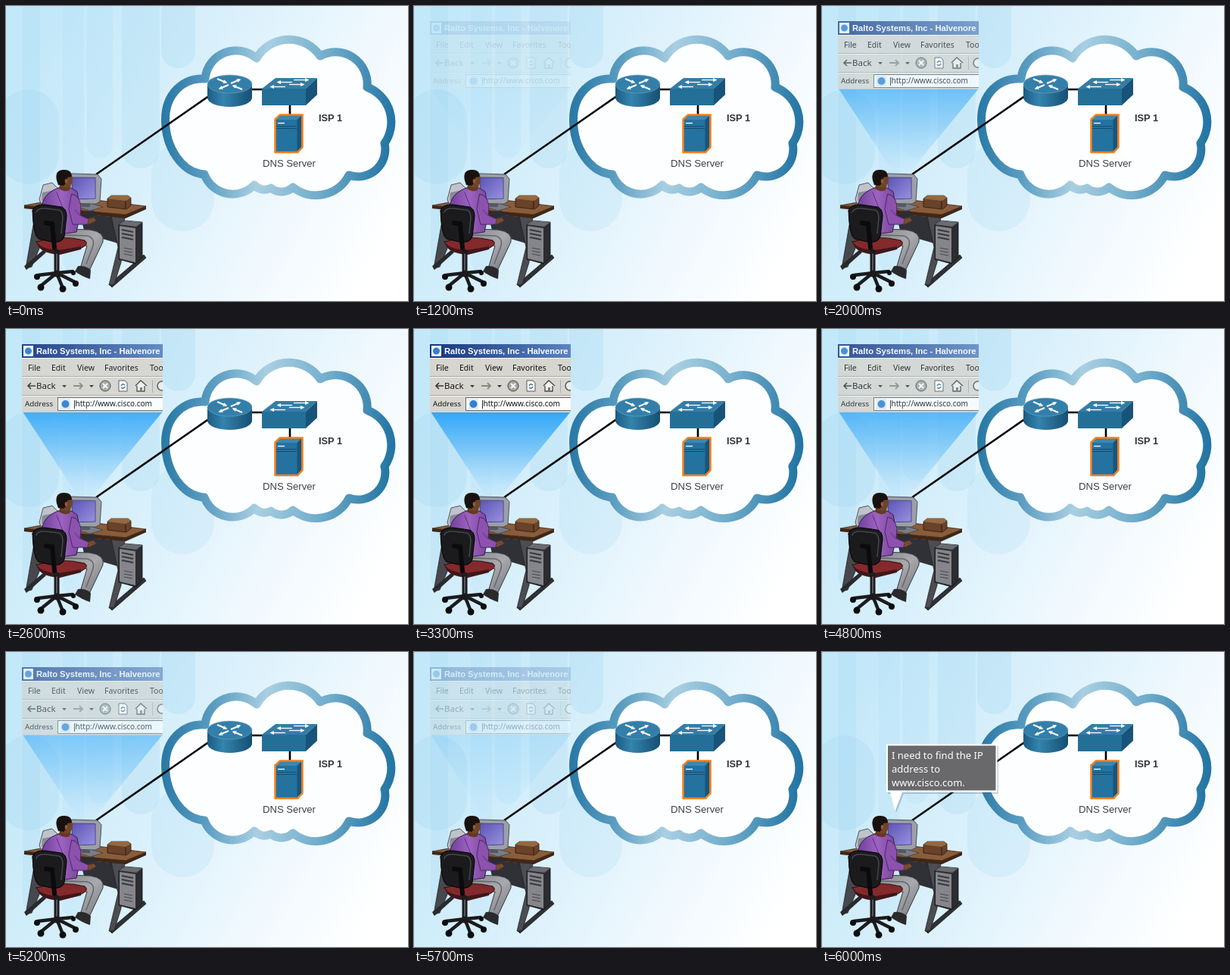
These frames come from a looping animation (531 px wide and 389 px high, 8000 ms). An HTML page:

```html
<!DOCTYPE html>
<html lang="en">
<head>
<meta charset="utf-8">
<title>DNS lookup</title>
<style>
  html, body { margin: 0; width: 100%; height: 100%; overflow: hidden; }
  svg { display: block; width: 531px; height: 389px; }
  text { white-space: pre; }
  .label { font: 13.1px "Liberation Sans", Arial, sans-serif; fill: #3f4042; }
  .bold { font: 700 12.800px "Liberation Sans", Arial, sans-serif; fill: #333436; }
  .ui { font-family: "Noto Sans", "Open Sans", sans-serif; fill: #111; }
  .say { font: 13px "Noto Sans", "Open Sans", sans-serif; fill: #fff; }
  .wire { stroke: #000; stroke-width: 2.6; fill: none; }
  .arrow { stroke: #fff; fill: none; marker-end: url(#tip); }
</style>
</head>
<body>
<svg viewBox="0 0 531 389" xmlns="http://www.w3.org/2000/svg">
  <defs>
    <linearGradient id="sky" x1="0" y1=".3" x2="1" y2=".68">
      <stop offset="0" stop-color="#c3e8f9"/>
      <stop offset=".4" stop-color="#d9f0fb"/>
      <stop offset=".75" stop-color="#f1f9fe"/>
      <stop offset="1" stop-color="#fff"/>
    </linearGradient>
    <linearGradient id="rim" x1="0" x2="1" y1=".45" y2=".5">
      <stop offset="0" stop-color="#2b7aa7"/>
      <stop offset=".2" stop-color="#5b9dc1"/>
      <stop offset=".43" stop-color="#a9cfe2"/>
      <stop offset=".7" stop-color="#72adcc"/>
      <stop offset="1" stop-color="#2576a4"/>
    </linearGradient>
    <linearGradient id="drum">
      <stop offset="0" stop-color="#1c5b82"/>
      <stop offset=".35" stop-color="#3384ae"/>
      <stop offset="1" stop-color="#174f73"/>
    </linearGradient>
    <linearGradient id="beamFill" x2="0" y2="1">
      <stop offset="0" stop-color="#2fa6f8"/>
      <stop offset=".45" stop-color="#83caf8"/>
      <stop offset="1" stop-color="#d3edfc" stop-opacity=".3"/>
    </linearGradient>
    <linearGradient id="bar">
      <stop offset="0" stop-color="#16347f"/>
      <stop offset="1" stop-color="#5c83be"/>
    </linearGradient>
    <linearGradient id="shirt">
      <stop offset="0" stop-color="#71409a"/>
      <stop offset=".5" stop-color="#9c63c0"/>
      <stop offset="1" stop-color="#764398"/>
    </linearGradient>
    <linearGradient id="pants" x2="1" y2="1">
      <stop offset="0" stop-color="#85868b"/>
      <stop offset=".5" stop-color="#a9aaae"/>
      <stop offset="1" stop-color="#77787d"/>
    </linearGradient>
    <linearGradient id="screen" x2="1" y2="1">
      <stop offset="0" stop-color="#5a55b4"/>
      <stop offset="1" stop-color="#9a92e0"/>
    </linearGradient>
    <marker id="tip" markerUnits="userSpaceOnUse" markerWidth="6" markerHeight="6" refX="4" refY="2.5" orient="auto">
      <path d="M0 0L5.500 2.500L0 5Z" fill="#fff"/>
    </marker>
    <clipPath id="pane"><rect x="21" y="20" width="186" height="90"/></clipPath>
  </defs>

  <rect width="531" height="389" fill="url(#sky)"/>
  <g id="stripes"></g>

  <path id="cloud" d="M263 96A41 41 0 0 1 331 69A49.500 49.500 0 0 1 415 66A42 42 0 0 1 477 107A49 49 0 0 1 500 181A36 36 0 0 1 453 223A49 49 0 0 1 379 239A22 22 0 0 1 350 240A18 18 0 0 1 328 236A40 40 0 0 1 262 222C232 220 210.500 186 210.500 150C210.500 116 234 94 263 96Z"
    fill="#fdfeff" stroke="url(#rim)" stroke-width="11" stroke-linejoin="round"/>

  <path id="beam" d="M22 109H207L104 234Z" fill="url(#beamFill)" opacity="0"/>
  <path class="wire" d="M119 222L269 118M322 110H342M375 128V147"/>

  <!-- router -->
  <path d="M266 103V121A29.5 12 0 0 0 325 121V103Z" fill="url(#drum)"/>
  <ellipse cx="295.5" cy="103" rx="29.5" ry="12" fill="#347fa9" stroke="#6fa9c7" stroke-width=".6"/>
  <g stroke-width="2">
    <path class="arrow" d="M279 96L291 101"/>
    <path class="arrow" d="M312 110L300 105"/>
    <path class="arrow" d="M297 102L309 97"/>
    <path class="arrow" d="M294 104L282 109"/>
  </g>

  <!-- switch -->
  <path d="M338 109L356 95H411L396 109Z" fill="#337da7"/>
  <path d="M338 109H396V131H338Z" fill="#246f98"/>
  <path d="M396 109L411 95V117L396 131Z" fill="#185479"/>
  <g stroke-width="1.3">
    <path class="arrow" d="M380 97.500H399"/>
    <path class="arrow" d="M378 100.500H359"/>
    <path class="arrow" d="M374 103.500H393"/>
    <path class="arrow" d="M369 106.500H350"/>
  </g>

  <!-- server -->
  <path d="M355.5 149.500L362 143.500H391.5V186L385 193H355.5Z" fill="#2472a0" stroke="#f58220" stroke-width="2.600" stroke-linejoin="round"/>
  <path d="M357 150L362.500 145H390L384.500 150Z" fill="#3d87af"/>
  <path d="M384.500 150L390 145V186L384.500 191.500Z" fill="#195679"/>
  <path d="M357 158.500H384M357 161.500H384" stroke="#174e70"/>
  <path d="M359 154.500H368" stroke="#fff" stroke-width="1.300"/>

  <text class="label" x="339" y="212">DNS Server</text>
  <text class="bold" x="413" y="152">ISP 1</text>

  <g id="desk" stroke-linejoin="round">
    <path d="M39 272L50 270L48 310L34 344L26 346Z" fill="#46484d" stroke="#222" stroke-width=".8"/>
    <path d="M24 343L50 321L53 325L27 348Z" fill="#292a2e"/>
    <path d="M98 274L152 279L148 313L104 300Z" fill="#303136"/>
    <path d="M136 367L182 328L185 332L140 371Z" fill="#303136" stroke="#111" stroke-width=".7"/>
    <path d="M139 277L157 276L152 338L143 367L136 368L148 318Z" fill="#4b4d52" stroke="#222" stroke-width=".8"/>
    <path d="M24 263L62 256L120 256L185 264L158 275Z" fill="#8a5c39" stroke="#3a2415" stroke-width=".8"/>
    <path d="M24 263L158 275L185 264V268L158 280L24 267Z" fill="#3f2617"/>
    <path d="M134 254L139 250H161L165 253V263L159 268L134 265Z" fill="#69422a" stroke="#2c190e" stroke-width=".8"/>
    <path d="M134 254L139 250H161L165 253L158 257Z" fill="#96683f"/>
    <path d="M158 257V267" stroke="#2c190e"/>
    <!-- tower -->
    <path d="M149 288L157 283L180 285V331L171 340L149 334Z" fill="#2b2d31" stroke="#111" stroke-width=".8"/>
    <path d="M149 288L157 283L180 285L172 291Z" fill="#6a6c72"/>
    <path d="M150 290L171 293V338L150 333Z" fill="#84868b"/>
    <path d="M153 295L168 298M153 300L168 303M153 305L168 308" stroke="#37383c" stroke-width="2"/>
    <path d="M156 319L167 321M156 323L167 325M156 327L167 329" stroke="#45474c"/>
    <!-- phone and monitor -->
    <path d="M44 255L49 236L61 233L68 240L65 260L46 260Z" fill="#bfc3cb" stroke="#53565d"/>
    <path d="M48 246L63 243L61 255L47 257Z" fill="#868b96"/>
    <path d="M91 264L108 259L128 265L111 270Z" fill="#797d86" stroke="#41434a" stroke-width=".8"/>
    <path d="M100 257H111V265H100Z" fill="#555960"/>
    <path d="M83 224L87 221L121 222L126 228L124 258L118 261L86 260Z" fill="#9b9fa8" stroke="#50535b"/>
    <path d="M87 226L118 226.500L118 254L88 255Z" fill="url(#screen)" stroke="#3c397d" stroke-width=".8"/>
    <path d="M97 275L115 270L122 273L107 279Z" fill="#2b2c31"/>
  </g>

  <g id="sitter" stroke-linejoin="round" stroke-linecap="round">
    <!-- legs -->
    <path d="M72 294L111 295Q131 298 128 311L111 347L99 343L107 316L72 318Z" fill="url(#pants)" stroke="#35373e"/>
    <path d="M77 302L107 303Q119 306 114 319L106 340" fill="none" stroke="#65666c" stroke-width="1.500"/>
    <path d="M95 343Q105 342 112 348L111 360Q101 357 91 350Z" fill="#2a2a2d"/>
    <!-- body -->
    <path d="M69 240Q82 235 94 245L99 271L93 298L63 302L48 276Q43 249 69 240Z" fill="url(#shirt)" stroke="#3a1c50"/>
    <path d="M87 248Q97 250 99 264L98 276L109 281L108 288L88 288L83 268Z" fill="#8c52ae" stroke="#4c2664"/>
    <path d="M108 281L116 279L119 283L109 288Z" fill="#794a2c"/>
    <path d="M67 246L75 266M91 269L97 276" stroke="#5e2d7c" fill="none"/>
    <!-- head -->
    <path d="M72 232L85 234L84 243Q77 246 70 241Z" fill="#643920"/>
    <ellipse cx="79" cy="229" rx="9" ry="11" fill="#6f4429"/>
    <path d="M67 230Q64 217 75 216Q87 215 87 225L81 226L80 233L76 237L69 236Z" fill="#19110f"/>
    <ellipse cx="79.500" cy="231" rx="1.800" ry="3" fill="#8f5b39"/>
    <!-- chair -->
    <path d="M40 311Q72 301 104 309Q111 314 98 320L70 325Q46 323 40 311Z" fill="#84292c" stroke="#251011"/>
    <path d="M41 312Q48 321 70 322L99 317V321L71 328Q43 326 41 312Z" fill="#421619"/>
    <path d="M35 270Q37 261 52 262L73 265Q80 267 80 277L77 304Q74 313 60 311L43 307Q36 302 35 270Z" fill="#1b1b1e" stroke="#000"/>
    <path d="M40 272Q42 266 53 267L70 269Q75 271 75 280L73 300" fill="none" stroke="#45464b" stroke-width="1.500"/>
    <path d="M53 286L61 287L64 319" stroke="#0b0b0d" stroke-width="6" fill="none"/>
    <path d="M67 324V354" stroke="#1b1b1e" stroke-width="7"/>
    <path d="M67 327V348" stroke="#6b6d74" stroke-width="1.500"/>
    <path d="M67 352L42 355M67 352L46 369M67 352L75 372M67 352L91 364M67 352L88 350" stroke="#1b1b1e" stroke-width="4.500"/>
    <g fill="#0d0d10">
      <circle cx="41" cy="357" r="4"/><circle cx="46" cy="371" r="4.500"/>
      <circle cx="75" cy="373" r="4.500"/><circle cx="92" cy="366" r="4"/><circle cx="89" cy="352" r="3"/>
    </g>
  </g>

  <g id="browser" clip-path="url(#pane)" opacity="0">
    <rect x="21" y="20" width="186" height="90" fill="#d8d5cf"/>
    <rect x="21" y="20" width="186" height="18" fill="url(#bar)"/>
    <rect x="23" y="22" width="13" height="14" fill="#f6f9fc"/>
    <circle cx="29.500" cy="29" r="4.500" fill="#2f7fd0"/>
    <text x="40" y="33" fill="#fff" style="font:700 11.200px 'Liberation Sans',Arial,sans-serif">Ralto Systems, Inc - Halvenore</text>
    <path d="M21 62.500H207M21 87.500H207" stroke="#aaa69e"/>
    <path d="M21 63.500H207M21 88.500H207M21 38.500H207" stroke="#f8f7f4"/>
    <g class="ui" font-size="10.500">
      <text x="29" y="55">File</text><text x="60" y="55">Edit</text><text x="94" y="55">View</text>
      <text x="130" y="55">Favorites</text><text x="190" y="55">Tools</text>
      <text x="40" y="79" font-size="11.500">Back</text>
      <text x="25" y="102" font-size="9.800">Address</text>
    </g>
    <path d="M39 75H29M33 71L29 75L33 79" stroke="#333" stroke-width="1.600" fill="none"/>
    <path d="M74 74H80L77 77ZM110 74H116L113 77Z" fill="#333"/>
    <path d="M89 75H101M97 71L101 75L97 79" stroke="#888" stroke-width="1.800" fill="none"/>
    <circle cx="131" cy="75" r="7" fill="#a5a5a5" stroke="#444"/>
    <path d="M128 72L134 78M134 72L128 78" stroke="#fff" stroke-width="2"/>
    <path d="M149 68H157L160 71V82H149Z" fill="#fff" stroke="#555"/>
    <path d="M152 75Q154 71 157 74M157 76Q155 80 152 77" fill="none" stroke="#4a6b8a" stroke-width="1.500"/>
    <path d="M171 75L178 68L186 75M173 75V82H183V75" fill="#f3f1ec" stroke="#444" stroke-width="1.300"/>
    <path d="M177 82V77H180V82" fill="#777"/>
    <path d="M193.500 67V84" stroke="#aaa"/>
    <circle cx="206" cy="75" r="6" fill="#eee" stroke="#555" stroke-width="1.500"/>
    <rect x="68.500" y="90.500" width="150" height="17" fill="#fff" stroke="#666"/>
    <rect x="72" y="92" width="13" height="14" fill="#e4edf6"/>
    <circle cx="78.500" cy="99" r="5" fill="#2f7fd0"/>
    <path d="M90.500 94V105" stroke="#222"/>
    <text class="ui" x="91.500" y="102" font-size="10">http://www.cisco.com</text>
  </g>

  <g id="bubble" visibility="hidden">
    <path d="M87 124H233V187H108L98 212L92 187H87Z" fill="#49616e" opacity=".3"/>
    <path d="M85 121.500H231.500V185H106L96.500 210L90 185H85Z" fill="#fff"/>
    <rect x="87" y="123.500" width="142.500" height="59" fill="#69696b"/>
    <text class="say" x="92" y="141">I need to find the IP</text>
    <text class="say" x="92" y="159">address to</text>
    <text class="say" x="92" y="177">www.cisco.com.</text>
  </g>
</svg>
<script>
  const $ = id => document.getElementById(id);
  const LOOP = 8000, STEP = 100;

  // Rounded background bars: x, y, width, height, opacity
  const bars = [
    [-10, 110, 80, 125, .2],
    [22, -40, 23, 380, .16],
    [75, -40, 28, 390, .12],
    [107, -40, 34, 240, .14],
    [153, -40, 50, 254, .2],
    [205, -40, 45, 122, .22],
    [192, 180, 83, 117, .16]
  ];
  $('stripes').innerHTML = bars.map(([x, y, w, h, o]) =>
    `<rect x="${x}" y="${y}" width="${w}" height="${h}" rx="${w / 2}" fill="#8fcbec" opacity="${o}"/>`).join('');

  const part = (t, from, to) => Math.min(1, Math.max(0, (t - from) / (to - from)));

  function windowAlpha(t) {
    const fadeIn = 1 - (1 - part(t, 1100, 3800)) ** 3;
    const fadeOut = 1 - part(t, 3900, 6000) ** 2;
    return fadeIn * fadeOut;
  }

  const start = performance.now();
  function draw(now) {
    const time = Math.max(0, now - start) % LOOP;
    const t = Math.floor(time / STEP) * STEP;
    const alpha = windowAlpha(t);
    $('browser').setAttribute('opacity', alpha);
    $('beam').setAttribute('opacity', alpha ** 1.5);
    $('bubble').setAttribute('visibility', t >= 6000 ? 'visible' : 'hidden');
    requestAnimationFrame(draw);
  }
  draw(start);
</script>
</body>
</html>
```
